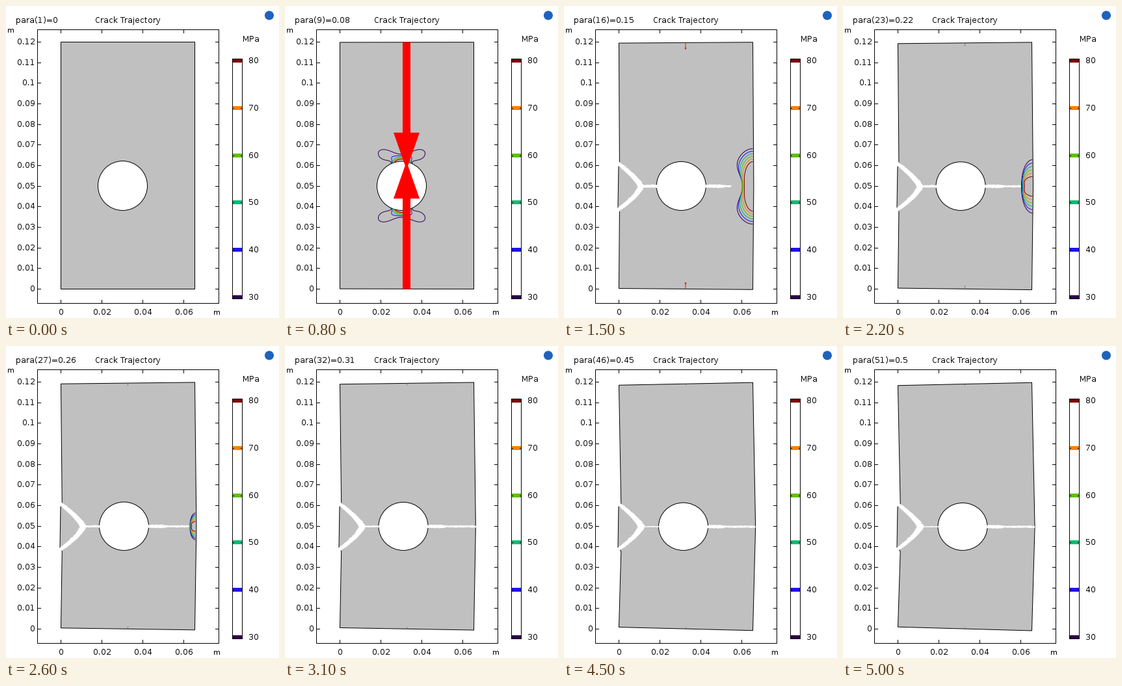
These frames come from a looping animation (420x480 px, 5100 ms). A matplotlib script:

```python
import numpy as np
import matplotlib.pyplot as plt
from matplotlib.animation import FuncAnimation
from matplotlib.patches import Circle, Ellipse, Polygon, Rectangle

W, H, DPI = 420, 480, 100
PX = 72 / DPI
FRAMES, STEP_MS = 51, 100
BREAK = 10                      # first step with a cracked plate
LEVELS = {30: "#300050", 40: "#2010f0", 50: "#00bd74",
          60: "#62c000", 70: "#ff8000", 80: "#800000"}
GRAY = "#c0c0c0"
LEFT, RIGHT, TOP, BOTTOM = 84.5, 290.5, 55.5, 435.5
LOAD_X, MID, RADIUS = 187, 277.5, 38

plt.rcParams.update({"font.family": "DejaVu Sans", "path.snap": False,
                     "text.hinting": "native", "text.hinting_factor": 1})
fig = plt.figure(figsize=(W / DPI, H / DPI), dpi=DPI, facecolor="white")
ax = fig.add_axes([0, 0, 1, 1])
ax.set(xlim=(0, W), ylim=(H, 0))
ax.axis("off")


def line(x, y, color="black", width=1, **kw):
    return ax.plot(x, y, color=color, lw=width * PX,
                   solid_capstyle="butt", **kw)[0]


def label(x, y, text, ha="left", size=12):
    return ax.text(x, y, text, ha=ha, va="baseline", fontsize=size * PX)


def box(x, y, w, h):
    ax.add_patch(Rectangle((x + 0.5, y + 0.5), w, h, fc="none", ec="black",
                           lw=PX))


def shape(points, fill="white", edge="none", z=2):
    return ax.add_patch(Polygon(points, closed=True, fc=fill, ec=edge,
                                lw=PX, zorder=z))


def mix(a, b, t):
    return a + (b - a) * t


# --- static scene ---------------------------------------------------------

def draw_axes():
    box(48, 36, 279, 421)
    for k in range(13):
        y = round(435 - k * 380 / 12)
        for x in (49, 322):
            line([x, x + 5], [y + 0.5, y + 0.5])
        label(45, y + 4, f"{k / 100:g}", "right")
    for k in range(4):
        x = 84 + 63 * k
        for y in (37, 452):
            line([x + 0.5, x + 0.5], [y, y + 5])
        label(x + 1, 475, f"{k / 50:g}", "center")
    label(2, 41, "m", size=11)
    label(319, 475, "m", size=11)
    label(137, 26, "Crack Trajectory")


def draw_legend():
    label(364, 55, "MPa")
    for value, color in LEVELS.items():
        y = round(448 - (value - 30) * 7.28)
        ax.add_patch(Rectangle((348, y - 3), 16, 6, fc=color))
        for x in (348, 361):
            line([x, x + 3], [y + 0.5, y + 0.5])
        label(373, y + 4, value)
    box(348, 81, 15, 369)


draw_axes()
draw_legend()
ax.add_patch(Circle((405, 14.5), 7, fc="#1f62bd", ec="none"))
counter = label(15, 26, "")

# --- stress contours ------------------------------------------------------

def kirsch(r, theta):
    """Largest principal stress around a hole under unit compression."""
    p2 = (RADIUS / r) ** 2
    p4 = p2 ** 2
    c, s = np.cos(2 * theta), np.sin(2 * theta)
    radial = -((1 - p2) + (1 - 4 * p2 + 3 * p4) * c) / 2
    hoop = -((1 + p2) - (1 + 3 * p4) * c) / 2
    shear = (1 + 2 * p2 - 3 * p4) * s / 2
    return (radial + hoop) / 2 + np.hypot((radial - hoop) / 2, shear)


R, THETA = np.meshgrid(np.linspace(RADIUS, 100, 90),
                       np.linspace(0, 2 * np.pi, 361))
GRID_X, GRID_Y = 179.5 + R * np.sin(THETA), 276.5 - R * np.cos(THETA)
FIELD = kirsch(R, THETA)


def hole_contours(i):
    stress = 14.7 * i * FIELD
    if stress.max() < min(LEVELS):
        return []
    return [ax.contour(GRID_X, GRID_Y, stress, levels=list(LEVELS),
                       colors=list(LEVELS.values()), linewidths=PX,
                       zorder=5)]


def edge_contours(i):
    """Dented half ellipses between the crack tip and the right edge."""
    if i >= 30:
        return []
    u = np.clip((i - 15) / 7, -0.5, 1)
    shrink = min(1, (30 - i) / 8)
    phi = np.linspace(-np.pi / 2, np.pi / 2, 80)
    curves = []
    for value, color in LEVELS.items():
        q = (value - 30) / 50
        height = shrink * mix(58 - 20 * q, 41 - 26 * q, u)
        width = shrink * mix(33 - 18 * q, 17.5 - 2.5 * q, u)
        dent = mix(0.53 - 0.4 * q, 0.03 + 0.15 * q, u)
        x = width * np.cos(phi) * (1 - dent * np.cos(phi) ** 8)
        curves.append(line(290.5 + u - x, MID + height * np.sin(phi), color,
                           zorder=5))
    return curves


# --- cracks ---------------------------------------------------------------

rng = np.random.default_rng(4)
ROUGH = rng.normal(0, 0.35, (2, W))


def band(x0, x1, y, half):
    x = np.arange(x0, x1 + 0.5)
    rough = ROUGH[:, x.astype(int)] * np.minimum(1, half(x) / 1.6)
    top = np.column_stack([x, y - half(x) + rough[0]])
    low = np.column_stack([x, y + half(x) + rough[1]])
    return np.vstack([top, low[::-1]])


def fork(i):
    """Two arms from the left edge that meet in front of the hole."""
    dy = np.arange(-43, 44)
    opening = 0.09 * (i - 15)

    def side(offset, gap, rough):
        x = 118 + offset - 35 * ((abs(dy) + gap) / 36) ** 1.4
        x = np.maximum(x + 1.5 * rough[:len(dy)], 82)
        return np.column_stack([x, MID + 0.5 + dy])

    return np.vstack([side(5 + opening, max(opening, 0), ROUGH[0]),
                      side(-5, 0, ROUGH[1])[::-1]])


def cracks(i, left, right):
    y = 276.8 + 0.025 * i
    tip = min(257 + 2.5 * (i - 15), 290.8 + 0.092 * i)
    neck = max(0.8, 3.2 - 0.06 * i)
    return [fork(i),
            band(119, left + 2, y, lambda x: np.full_like(x, neck)),
            band(right - 1, tip, y,
                 lambda x: np.interp(x, [242, 248], [2.5, 1.6]))]


# --- plate and loads ------------------------------------------------------

def plate(i):
    if i < BREAK:
        d = 0.05 * i
        return [(LEFT, TOP + d), (RIGHT, TOP + d / 2),
                (RIGHT, BOTTOM), (LEFT, BOTTOM - d)]
    bulge = LEFT - 0.3 + 0.08 * i
    return [(LEFT, TOP + 0.105 * i), (RIGHT, TOP + 0.016 * i),
            (RIGHT + 0.092 * i, 278), (RIGHT, BOTTOM + 0.05 * i),
            (LEFT, BOTTOM - 0.065 * i), (bulge, 316), (83, 310),
            (84, 247), (bulge, 243)]


def arrow(y, sign, length):
    k = length / 196
    tip, neck = y + sign * length, y + sign * 139 * k
    if length < 7:
        return line([LOAD_X + 0.5] * 2, [y, tip], "#806060", 0.8, zorder=7)
    half, shaft = max(20 * k, 1.6), max(6 * k, 0.45)
    side = [(shaft, y), (shaft, neck), (half, neck)]
    pts = ([(LOAD_X + x, v) for x, v in side] + [(LOAD_X, tip)]
           + [(LOAD_X - x, v) for x, v in side[::-1]])
    return shape(pts, "red", z=7)


def load(i):
    if i < BREAK:
        return 24.5 * i
    return 2.5 + 8.5 * np.exp(-(i - 15) / 6)


moving = []


def draw(i):
    while moving:
        moving.pop().remove()
    counter.set_text(f"para({i + 1})={i / 100:g}")
    broken = i >= BREAK

    body = plate(i)
    moving.append(shape(body, GRAY, "black"))
    cx = 179.5 + max(0, 0.107 * i - 0.8) * broken
    hole = Ellipse((cx, 276.5 + 0.028 * i), 2 * RADIUS,
                   2 * RADIUS - 0.06 * i, fc="white", ec="black", lw=PX,
                   zorder=3)
    moving.append(ax.add_patch(hole))

    if broken:
        moving.extend(shape(pts, z=4)
                      for pts in cracks(i, cx - RADIUS, cx + RADIUS))
        moving.extend(edge_contours(i))
    else:
        moving.extend(hole_contours(i))

    if i:
        t = (LOAD_X - LEFT) / (RIGHT - LEFT)
        low_right, low_left = (body[3], body[4]) if broken else body[2:]
        moving.append(arrow(mix(body[0][1], body[1][1], t), 1, load(i)))
        moving.append(arrow(mix(low_left[1], low_right[1], t), -1, load(i)))
    return moving


anim = FuncAnimation(fig, draw, frames=FRAMES, interval=STEP_MS,
                     init_func=lambda: draw(0), repeat=True, repeat_delay=0,
                     blit=False)
plt.show()
```
